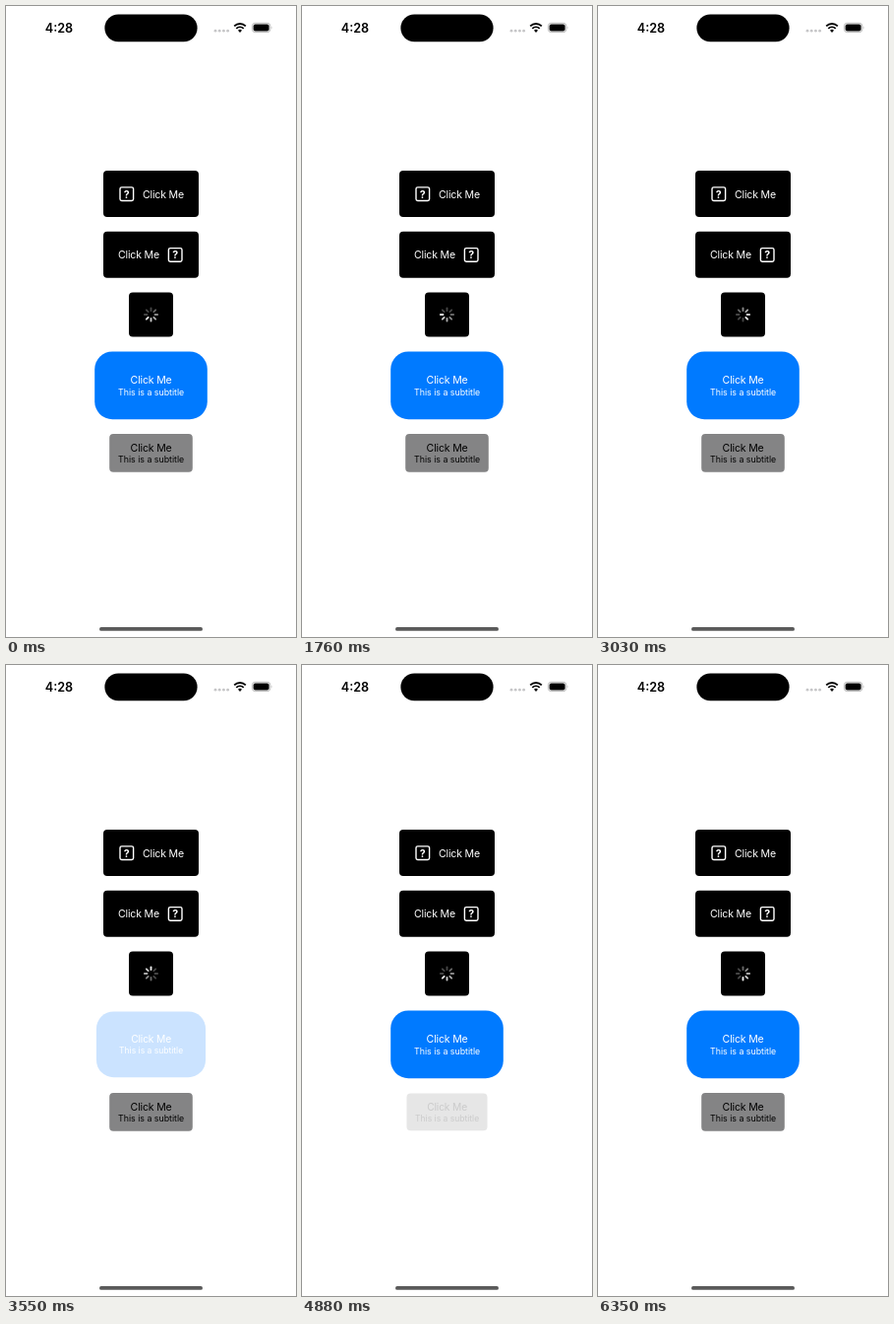
An HTML page for the animation above (6.45 s loop, 295 by 640 pixels).

```html
<!DOCTYPE html>
<html lang="en">
<head>
<meta charset="utf-8">
<title>Button styles</title>
<style>
  html, body { margin: 0; width: 100%; height: 100%; overflow: hidden; background: #fff; }
  svg { display: block; font-family: Inter, "Open Sans", sans-serif; }
  .label { font-size: 10.6px; letter-spacing: -.18px; text-anchor: middle; }
  .subtitle { font-size: 8.8px; text-anchor: middle; }
  .mark { font-size: 10.6px; font-weight: 700; text-anchor: middle; }
  .clock { font-size: 12.6px; font-weight: 600; text-anchor: middle; }
  .button { transform-box: fill-box; transform-origin: center; }
</style>
</head>
<body>
<svg width="295" height="640" viewBox="0 0 295 640">
  <defs>
    <g id="icon" fill="#fff">
      <rect x="-6.8" y="-6.8" width="13.6" height="13.6" rx="1.7" fill="none" stroke="#fff" stroke-width="1.4"/>
      <text class="mark" y="3.9">?</text>
    </g>
  </defs>

  <text class="clock" x="54" y="26.7">4:28</text>
  <rect x="100.4" y="8.4" width="94.2" height="27.8" rx="13.9"/>
  <g fill="#c6c6c8">
    <circle cx="213" cy="25.2" r="1.4"/><circle cx="217.2" cy="25.2" r="1.4"/>
    <circle cx="221.4" cy="25.2" r="1.4"/><circle cx="225.6" cy="25.2" r="1.4"/>
  </g>
  <g fill="none" stroke="#000" stroke-width="1.8">
    <path d="M232.2 20.3a8.4 8.4 0 0 1 11.6 0M234.3 22.8a5.4 5.4 0 0 1 7.4 0"/>
    <path d="M238 26.9l-2-2.2a2.9 2.9 0 0 1 4 0z" fill="#000" stroke="none"/>
  </g>
  <rect x="250.4" y="17.3" width="18.4" height="9.3" rx="3" fill="none" stroke="#a6a6a6" stroke-width=".8"/>
  <rect x="251.6" y="18.5" width="16" height="6.9" rx="1.9"/>
  <path d="M269.8 20.4q1.4 1.5 0 3z" fill="#a6a6a6"/>

  <g class="button" data-press="820">
    <rect x="99" y="167" width="97" height="47" rx="4"/>
    <use href="#icon" x="122.8" y="190.7"/>
    <text class="label" x="160" y="194.6" fill="#fff">Click Me</text>
  </g>
  <g class="button" data-press="2005">
    <rect x="99" y="228.8" width="97" height="47" rx="4"/>
    <text class="label" x="135" y="256.2" fill="#fff">Click Me</text>
    <use href="#icon" x="172.2" y="252.4"/>
  </g>
  <rect x="125" y="290.4" width="45" height="45.2" rx="4"/>
  <g id="spinner" transform="translate(147.5 313)" stroke="#fff" stroke-width="1.9" stroke-linecap="round"></g>
  <g class="button" data-press="3390">
    <rect x="90.2" y="350.4" width="114.6" height="68.8" rx="18" fill="#007aff"/>
    <text class="label" x="147.6" y="383.4" fill="#fff">Click Me</text>
    <text class="subtitle" x="147.6" y="394.8" fill="#fff">This is a subtitle</text>
  </g>
  <g class="button" data-press="4710">
    <rect x="105.2" y="434" width="84.6" height="38.8" rx="4" fill="#848485"/>
    <text class="label" x="147.6" y="452">Click Me</text>
    <text class="subtitle" x="147.6" y="463.4">This is a subtitle</text>
  </g>

  <rect x="95" y="630" width="105" height="3.8" rx="1.9" fill="#5a5a5a"/>
</svg>
<script>
  const LOOP = 6450, PRESS = 150, HOLD = 200, RELEASE = 300, STEP = 100, PETALS = 8;
  const buttons = [...document.querySelectorAll('.button')];
  const spinner = document.getElementById('spinner');

  const petals = Array.from({ length: PETALS }, (_, i) => {
    const line = document.createElementNS('http://www.w3.org/2000/svg', 'line');
    line.setAttribute('y1', -4);
    line.setAttribute('y2', -6.6);
    line.setAttribute('transform', `rotate(${i * 360 / PETALS})`);
    return spinner.appendChild(line);
  });

  const clamp = x => Math.min(1, Math.max(0, x));
  const easeOut = x => 1 - (1 - x) ** 2;
  const easeInOut = x => (1 - Math.cos(Math.PI * x)) / 2;

  // 0 at rest, 1 fully pressed
  const pressAmount = t =>
    easeOut(clamp(t / PRESS)) * (1 - easeInOut(clamp((t - HOLD) / RELEASE)));

  function draw(now) {
    const t = now % LOOP;
    for (const button of buttons) {
      const amount = pressAmount(t - button.dataset.press);
      button.style.opacity = 1 - 0.8 * amount;
      button.style.transform = `scale(${1 - 0.03 * amount})`;
    }
    const head = Math.floor(t / STEP) + 5;
    petals.forEach((petal, i) => {
      const age = (head - i + PETALS * 2) % PETALS;
      petal.setAttribute('stroke-opacity', Math.max(0.27, 0.92 - 0.13 * age));
    });
  }

  const start = performance.now();
  function tick() {
    draw(performance.now() - start);
    requestAnimationFrame(tick);
  }
  tick();
</script>
</body>
</html>
```
